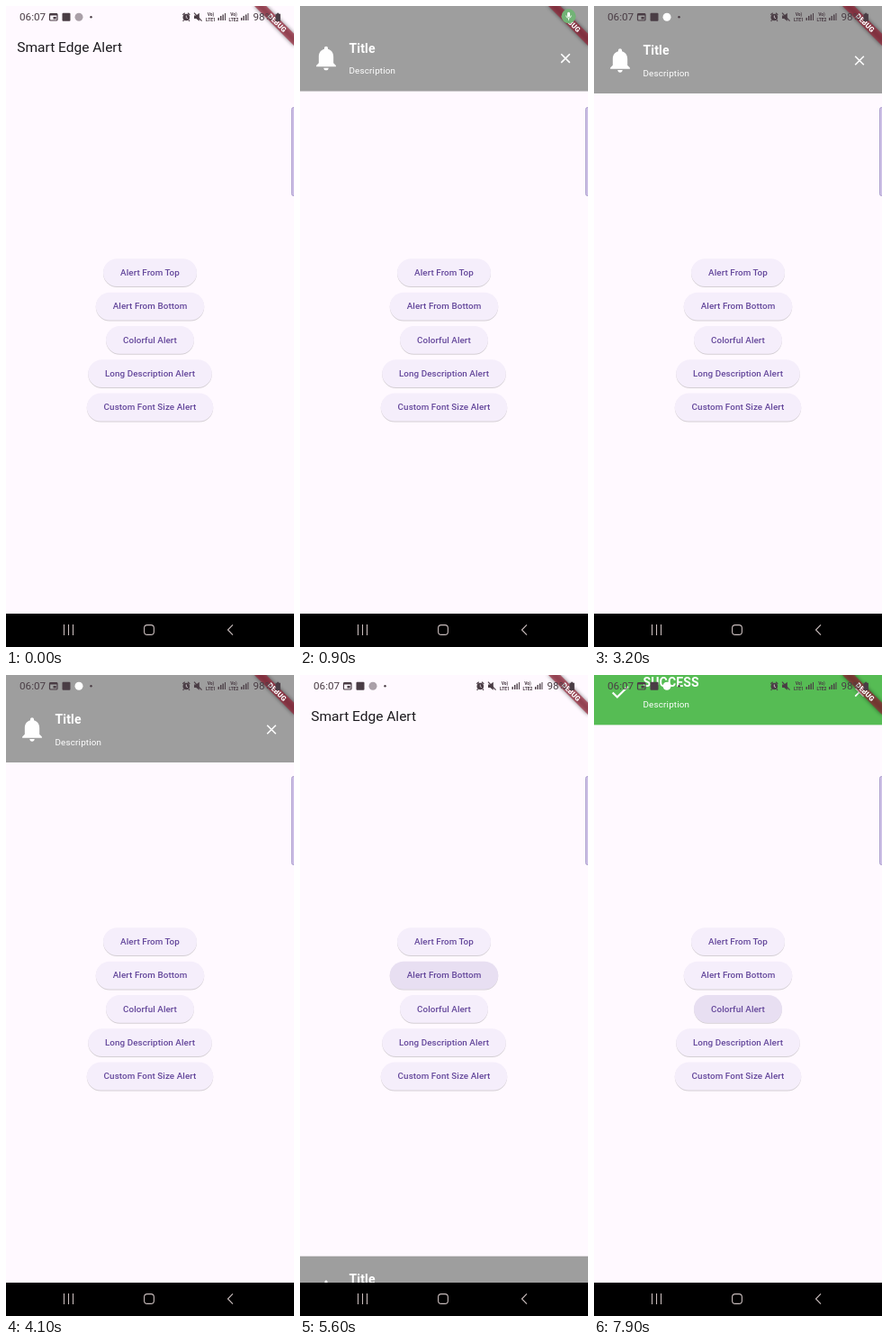
Write an HTML page that moves like this. It is 320x711 px and loops after 8 s.

```html
<!DOCTYPE html>
<html lang="en">
<head>
<meta charset="utf-8">
<title>Smart Edge Alert</title>
<style>
  html, body { margin: 0; width: 100%; height: 100%; overflow: hidden; background: #fff9ff; }
  svg { display: block; width: 100%; height: 100%; font-family: Roboto, sans-serif; }
  .button rect { fill: #f5eefb; filter: drop-shadow(0 1px .5px rgba(0, 0, 0, .17)); }
  .button .ink { fill: #d9cde8; filter: none; }
  .button text { font-size: 9.85px; font-weight: 500; letter-spacing: .07px; text-anchor: middle; fill: #64479b; }
  .alert text { fill: #fff; font-size: 9.8px; letter-spacing: .19px; }
  .alert .title { font-size: 14px; font-weight: 700; letter-spacing: .15px; }
  .line { fill: none; stroke: #fff; }
  .nav { fill: none; stroke: #c8bcbc; stroke-width: 1.1; }
  #status { fill: #4a3d45; }
  #status .line { stroke: #4a3d45; }
  .tiny { font-size: 5px; font-weight: 700; text-anchor: middle; }
</style>
</head>
<body>
<svg viewBox="0 0 320 711">
  <defs>
    <path id="bell" d="M12 22c1.1 0 2-.9 2-2h-4c0 1.1.9 2 2 2zm6-6v-5c0-3.07-1.64-5.64-4.5-6.32V4c0-.83-.67-1.5-1.5-1.5s-1.5.67-1.5 1.5v.68C7.63 5.36 6 7.92 6 11v5l-2 2v1h16v-1l-2-2z"/>
    <path id="check" d="M9 16.2L4.8 12l-1.4 1.4L9 19 21 7l-1.4-1.4z"/>
    <filter id="blur" x="-20%" y="-60%" width="140%" height="220%"><feGaussianBlur stdDeviation="2.2"/></filter>
    <g id="sim">
      <text class="tiny" x="6" y="11">Vo)</text>
      <path d="M14 16v-3h1.4v3zM16.5 16v-5h1.4v5zM19 16V9.5h1.4V16zM21.5 16V8h1v8z"/>
    </g>
  </defs>
  <rect width="320" height="711" fill="#fff9ff"/>
  <text x="12.3" y="51" font-size="15.5" fill="#1d1b1f">Smart Edge Alert</text>
  <g id="buttons"></g>
  <g id="alerts"></g>

  <!-- debug ribbon -->
  <g transform="translate(320 0) rotate(45)">
    <rect x="-31.1" y="21.8" width="62.2" height="9.3" opacity=".5" filter="url(#blur)"/>
    <rect x="-31.1" y="21.8" width="62.2" height="9.3" fill="#9c1f36" fill-opacity=".627"/>
    <text y="29.3" font-size="7.9" font-weight="900" text-anchor="middle" fill="#fff">DEBUG</text>
  </g>

  <!-- edge panel handle -->
  <path d="M321 112.5h-1.5q-2 0-2 2v94q0 2 2 2h1.500z" fill="#cdc0e6" stroke="#a092c6" stroke-width=".8"/>

  <g id="status">
    <text x="15" y="16" font-size="11.7">06:07</text>
    <rect class="line" x="48.5" y="8.5" width="8.5" height="7.5" rx="1" stroke-width="1.2"/>
    <path d="M48.5 8.5h8.5v2h-8.5zM52.5 12h3.2v2.5h-3.2z"/>
    <rect x="62.5" y="7.7" width="9" height="9" rx="1"/>
    <circle id="dot" cx="81" cy="12.2" r="4.5"/>
    <circle cx="94.5" cy="12.2" r="1.2"/>
    <circle cx="200.3" cy="12.5" r="3.8"/>
    <path class="line" d="M196.3 9.8l2.4-2M204.3 9.8l-2.4-2M197.6 15.6l-1 1.2M203 15.6l1 1.2" stroke-width="1.2"/>
    <path class="line" d="M200.3 10.5v2.3l1.6 1" style="stroke:#d8ced6" stroke-width=".9"/>
    <path d="M209 10.5h2.3l3.5-2.8v9l-3.5-2.8H209z"/>
    <path class="line" d="M209 7.7l8.5 9" stroke-width="1.2"/>
    <use href="#sim" x="221.5"/><text class="tiny" x="227.5" y="16.5">LTE1</text>
    <use href="#sim" x="247"/><text class="tiny" x="253" y="16.5">LTE2</text>
    <text x="274.5" y="16" font-size="11.7">98%</text>
    <path d="M299.5 8.8h1.7v-1h2v1h1.7v8.2h-5.4z"/>
  </g>
  <g id="mic" transform="translate(298.5 11.3)">
    <circle r="8" fill="#72b376"/>
    <rect x="-1.5" y="-4.5" width="3" height="5.5" rx="1.5" fill="#fff"/>
    <path class="line" d="M-2.8-.8a2.8 2.8 0 0 0 5.6 0M0 2v2.5" stroke-width=".9"/>
  </g>

  <!-- navigation bar -->
  <rect y="674" width="320" height="37"/>
  <path class="nav" d="M64.5 686v12M69.5 686v12M74.5 686v12"/>
  <rect class="nav" x="153.6" y="686.6" width="10.8" height="10.8" rx="3.4"/>
  <path class="nav" d="M252 686.3l-5.5 5.7 5.5 5.7"/>
</svg>
<script>
const LOOP = 8000, ENTER = 700, EXIT = 250;
const $ = id => document.getElementById(id);
const clamp = x => Math.max(0, Math.min(1, x));
const ramp = (t, from, to) => clamp((t - from) / (to - from));
const easeOut = p => 1 - (1 - p) ** 3;

const buttons = [
  { label: 'Alert From Top', width: 104, press: 150 },
  { label: 'Alert From Bottom', width: 120.5, press: 5300 },
  { label: 'Colorful Alert', width: 98, press: 7600 },
  { label: 'Long Description Alert', width: 137.5 },
  { label: 'Custom Font Size Alert', width: 140.5 }
];
const alerts = [
  { title: 'Title', icon: 'bell', scale: 1.36, fill: '#9e9e9e', start: 407, leave: 4396 },
  { title: 'Title', icon: 'bell', scale: 1, fill: '#9e9e9e', start: 5509, leave: 6650, bottom: true },
  { title: 'SUCCESS', icon: 'check', scale: 1.05, fill: '#56bc54', start: 7729, leave: LOOP }
];

$('buttons').innerHTML = buttons.map(({ label, width }, i) => {
  const box = `x="${160 - width / 2}" y="${280.3 + i * 37.33}" width="${width}" height="30.8" rx="15.4"`;
  return `<g class="button"><rect ${box}/><rect class="ink" ${box}/>
    <text x="160" y="${299 + i * 37.33}">${label}</text></g>`;
}).join('');

$('alerts').innerHTML = alerts.map(({ title, icon, scale, fill, bottom }) => `
  <g class="alert">
    <rect width="320" height="${bottom ? 85 : 97}" fill="${fill}"/>
    <g transform="translate(0 ${bottom ? 0 : 24})">
      <use href="#${icon}" fill="#fff" transform="translate(29 36.5) scale(${scale}) translate(-12 -12.2)"/>
      <text class="title" x="54.5" y="30.3">${title}</text>
      <text x="54.5" y="53.5">Description</text>
      <path class="line" d="M290.2 31.7l9.6 9.6m0-9.6l-9.6 9.6" stroke-width="1.6"/>
    </g>
  </g>`).join('');

const inks = document.querySelectorAll('.ink');
const panels = document.querySelectorAll('.alert');

// Share of an alert that has slid into view
function shown({ start, leave }, t) {
  return t < leave ? easeOut(ramp(t, start, start + ENTER))
                   : 1 - ramp(t, leave, leave + EXIT) ** 3;
}

function draw(now) {
  const t = now % LOOP;
  buttons.forEach(({ press = LOOP }, i) => {
    const level = Math.min(ramp(t, press, press + 100), 1 - ramp(t, press + 280, press + 600));
    inks[i].setAttribute('opacity', level * .5);
  });
  let cover = 0;
  alerts.forEach((alert, i) => {
    const share = shown(alert, t);
    if (!alert.bottom) cover = Math.max(cover, share);
    const y = alert.bottom ? 674 - 85 * share : 97 * (share - 1);
    panels[i].setAttribute('transform', `translate(0 ${y})`);
    panels[i].setAttribute('visibility', share > 0 ? 'visible' : 'hidden');
  });
  $('dot').setAttribute('fill', cover > .15 ? '#fff' : '#aaa0a8');
  $('status').setAttribute('opacity', 1 - ramp(t, 100, 350) + ramp(t, 2450, 2700));
  $('mic').setAttribute('opacity', ramp(t, 300, 600) - ramp(t, 2200, 2450));
  requestAnimationFrame(draw);
}
draw(performance.now());
</script>
</body>
</html>
```
